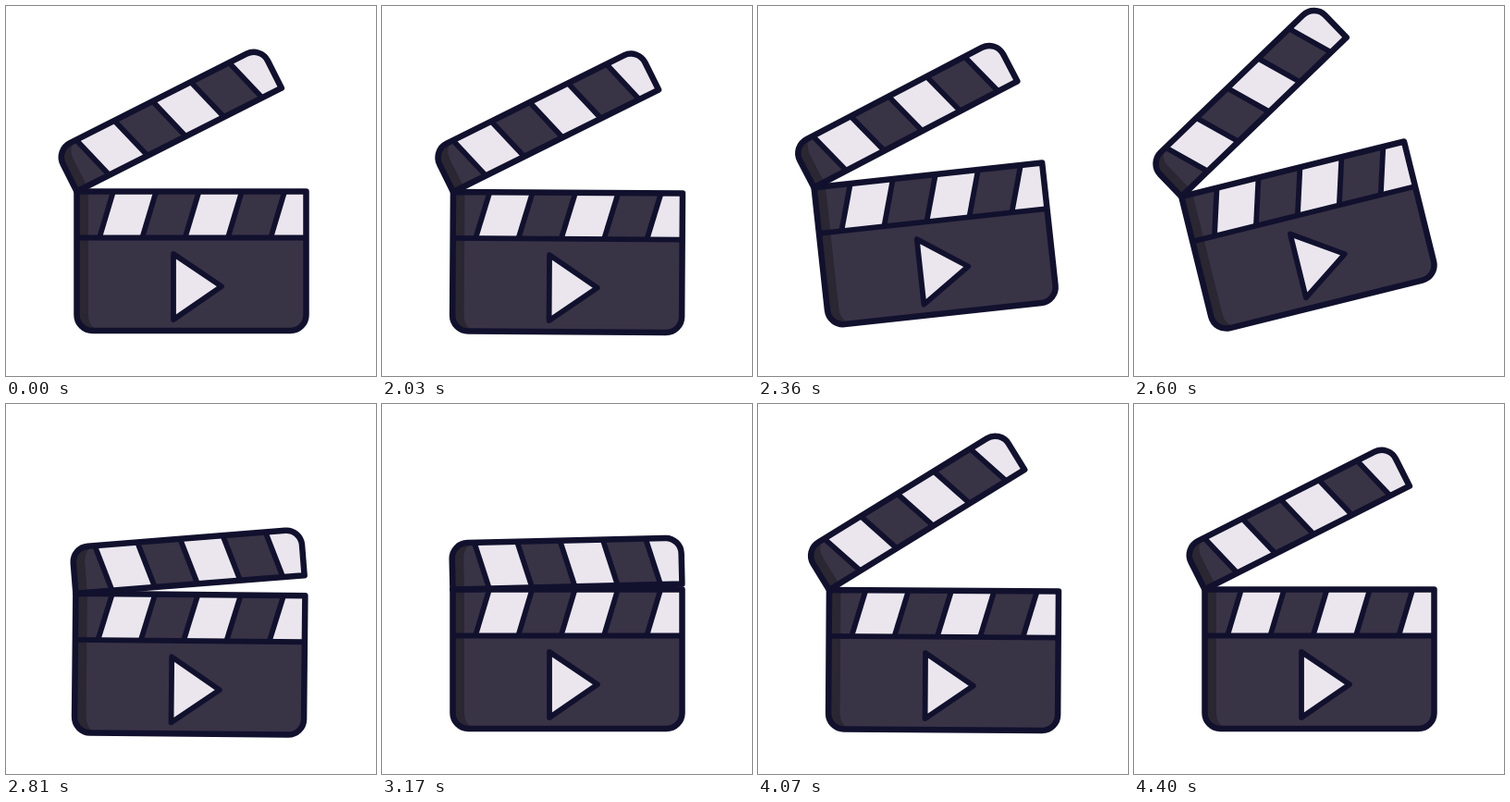
Recreate the animation shown at these times as an HTML page with a canvas. Size 400 by 400 pixels, loop 4430 ms.

```html
<!DOCTYPE html>
<html lang="en">
<head>
<meta charset="utf-8">
<title>Clapperboard</title>
<style>
  html, body { margin: 0; width: 100%; height: 100%; overflow: hidden; background: #fff; }
  canvas { display: block; width: 400px; height: 400px; }
</style>
</head>
<body>
<canvas id="stage" width="400" height="400"></canvas>
<script>
const ctx = document.getElementById('stage').getContext('2d');
const LOOP = 4430, START = 2000, STEP = 30;
const INK = '#11112e', SLATE = '#393346', SHADE = '#2a2632', PALE = '#ebe6ee';
const HINGE = { x: 76.5, y: 200.5 }, CENTER = { x: 200, y: 275 };
const WIDTH = 248, BODY = 150.5, STRIP = 50, RADIUS = 17;
const BARS = 5, FIRST_BAR = 39.5, PITCH = 46.3, SLANT = 15;
const LINE = 5.8, EDGE = 6.5;

// Smooth step from 0 to 1 between two times.
function ease(t, from, to) {
  const u = Math.min(1, Math.max(0, (t - from) / (to - from)));
  return u * u * (3 - 2 * u);
}

const pulse = (t, from, peak, to) => ease(t, from, peak) - ease(t, peak, to);

// The board sinks, leaps with a tilt, claps shut, then sinks again and reopens.
function pose(t) {
  const sink = ease(t, 2000, 2150) - ease(t, 2870, 3090) + pulse(t, 3590, 3870, 4120);
  const fall = ease(t, 2640, 2870);
  const rise = ease(t, 2150, 2450) - fall;
  const tilt = ease(t, 2150, 2540) - fall;
  return {
    x: -11 * rise,
    y: 12 * sink - 38.3 * rise,
    turn: 3.5 * sink - 17.4 * tilt,
    arm: -26.8 + 5.4 * ease(t, 2100, 2300) - 8.8 * ease(t, 2360, 2620) + 30.2 * fall
      - 1.9 * pulse(t, 2870, 3090, 3320)
      - 35.7 * ease(t, 3870, 4120) + 8.9 * ease(t, 4120, 4400)
  };
}

const rotate = degrees => ctx.rotate(degrees * Math.PI / 180);

function polygon(points, fill) {
  ctx.beginPath();
  points.forEach(([x, y]) => ctx.lineTo(x, y));
  ctx.closePath();
  ctx.fillStyle = fill;
  ctx.fill();
}

function line(x1, y1, x2, y2) {
  ctx.beginPath();
  ctx.moveTo(x1, y1);
  ctx.lineTo(x2, y2);
  ctx.stroke();
}

function outline(height) {
  const path = new Path2D();
  path.moveTo(0, 0);
  path.lineTo(WIDTH, 0);
  path.arcTo(WIDTH, height, 0, height, RADIUS);
  path.arcTo(0, height, 0, 0, RADIUS);
  path.closePath();
  return path;
}

function shadow(height) {
  ctx.fillStyle = SHADE;
  ctx.beginPath();
  ctx.moveTo(0, 0);
  ctx.lineTo(12.5, 0);
  ctx.lineTo(12.5, height - RADIUS);
  ctx.quadraticCurveTo(12.5, height - 5, 23, height);
  ctx.lineTo(0, height);
  ctx.fill();
}

function stripes() {
  for (let i = 0; i < BARS; i++) {
    const x = FIRST_BAR + i * PITCH, end = x + PITCH;
    if (i % 2 === 0) polygon([[x, 0], [end, 0], [end - SLANT, STRIP], [x - SLANT, STRIP]], PALE);
  }
  for (let i = 0; i < BARS; i++) {
    const x = FIRST_BAR + i * PITCH;
    line(x, 0, x - SLANT, STRIP);
  }
}

// Striped plate with its hinge at the origin and rounded far corners.
function plate(height) {
  const edge = outline(height);
  ctx.save();
  ctx.clip(edge);
  ctx.fillStyle = SLATE;
  ctx.fillRect(0, 0, WIDTH, height);
  shadow(height);
  stripes();
  if (height > STRIP) line(0, STRIP, WIDTH, STRIP);
  ctx.restore();
  ctx.lineWidth = EDGE;
  ctx.stroke(edge);
  ctx.lineWidth = LINE;
}

function draw(t) {
  const { x, y, turn, arm } = pose(t);
  ctx.fillStyle = '#fff';
  ctx.fillRect(0, 0, 400, 400);
  ctx.strokeStyle = INK;
  ctx.lineWidth = LINE;
  ctx.lineJoin = 'round';

  ctx.save();
  ctx.translate(CENTER.x + x, CENTER.y + y);
  rotate(turn);
  ctx.translate(HINGE.x - CENTER.x, HINGE.y - CENTER.y);
  plate(BODY);
  polygon([[104.5, 67.5], [104.5, 138.5], [156.5, 102.7]], PALE);
  ctx.stroke();

  rotate(arm);
  ctx.scale(1, -1);
  plate(STRIP);
  ctx.restore();
}

const origin = performance.now();
function frame() {
  const t = (performance.now() - origin) % LOOP;
  draw(START + Math.max(0, Math.floor((t - START) / STEP)) * STEP);
  requestAnimationFrame(frame);
}
frame();
</script>
</body>
</html>
```
